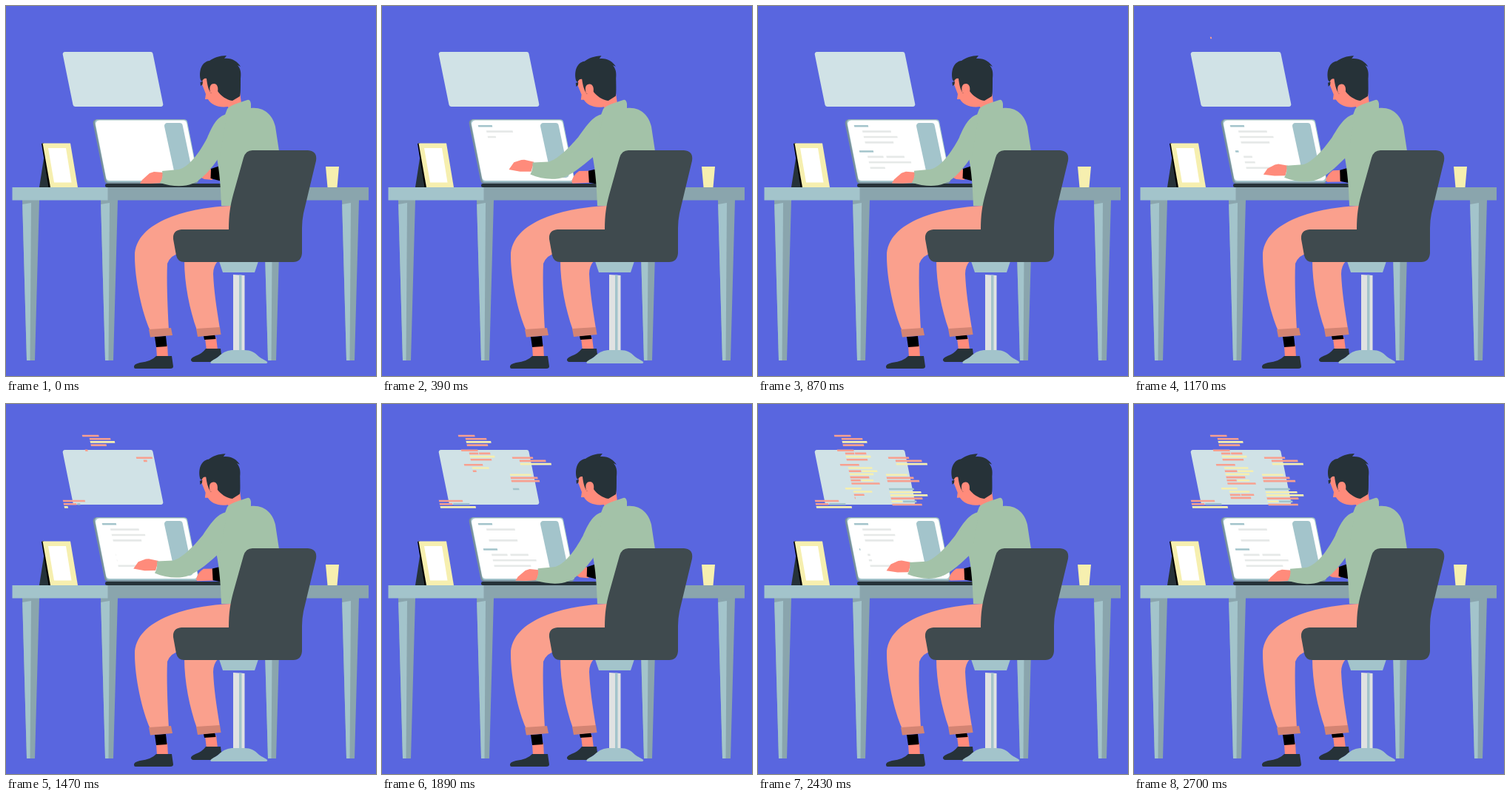
Recreate the animation shown at these times as an HTML page with a canvas. Size 500x500 px, loop 2730 ms.

```html
<!DOCTYPE html>
<html lang="en">
<head>
<meta charset="utf-8">
<title>Working at a desk</title>
<style>
html, body { margin: 0; width: 100%; height: 100%; overflow: hidden; background: #5966df; }
canvas { display: block; width: 500px; height: 500px; }
</style>
</head>
<body>
<canvas id="stage" width="500" height="500"></canvas>
<script>
const ctx = document.getElementById('stage').getContext('2d');
const LOOP = 2730, FRAME = 30, TYPING = 910, GROW = 270;
const C = {
  bg: '#5966df', light: '#a3c4cb', steel: '#8aa5ad', ink: '#263238', skin: '#ff8b7b',
  pants: '#faa08d', cuff: '#d48473', shirt: '#a3c2a8', chair: '#3f4a4e', cream: '#f6efaf',
  glass: '#d0e2e6', post: '#e0e2e2'
};
const INK = { S: '#f8a08f', Y: C.cream, B: C.light, P: '#e6e9e8' };

const clamp = v => Math.max(0, Math.min(1, v));
const easeInOut = u => u < .5 ? 4 * u ** 3 : 1 - 4 * (1 - u) ** 3;
const grow = (t, start) => easeInOut(clamp((t - start) / GROW));
// Swings from 1 to 0 and back once per typing beat.
const swing = t => (1 + Math.cos(2 * Math.PI * t / TYPING)) / 2;

function fill(color, d) {
  ctx.fillStyle = color;
  ctx.fill(new Path2D(d));
}

// Fills a shape between two poses that share the same commands.
function blend(color, from, to, k) {
  const target = to.match(/-?[\d.]+/g);
  let i = 0;
  fill(color, from.replace(/-?[\d.]+/g, n => +n + (target[i++] - n) * k));
}

function rounded(color, radius, ...p) {
  const n = p.length / 2;
  ctx.beginPath();
  ctx.moveTo((p[0] + p[2 * n - 2]) / 2, (p[1] + p[2 * n - 1]) / 2);
  for (let i = 0; i < n; i++) {
    const j = (i + 1) % n;
    ctx.arcTo(p[2 * i], p[2 * i + 1], p[2 * j], p[2 * j + 1], radius);
  }
  ctx.closePath();
  ctx.fillStyle = color;
  ctx.fill();
}

// Each group is a stack of rows; a word such as "SY" is a row split in two colours.
const hologram = [
  { start: 1095, step: 71, groups: [
    { x: 103, y: 43, indent: 9, width: 28, rows: 'S S Y S' },
    { x: 107, y: 62.7, indent: 10, width: 28, rows: 'S SS Y S' },
    { x: 111, y: 82.3, indent: 10, width: 32, rows: 'S Y SY Y S SY S' },
    { x: 118, y: 114.3, indent: 10, width: 27, rows: 'Y Y SS S' }
  ] },
  { start: 1303, step: 80, groups: [
    { x: 176, y: 72.7, indent: 9, width: 35, rows: 'S S Y' },
    { x: 173, y: 95.7, indent: 0, width: 36, rows: 'Y S S' },
    { x: 177, y: 115, indent: 0, width: 42, rows: 'B Y Y S YB S' }
  ] },
  { start: 1270, step: 60, groups: [
    { x: 77, y: 131, indent: 0, width: 40, rows: 'S SB Y' }
  ] }
].map(s => ({ ...s, pitch: 4.2, slant: .9, gap: 1 }));

// Rows listed as retyped are erased and written again from the given time on.
const screenText = {
  start: 100, step: 92, pitch: 7.4, slant: 1.7, gap: 4, header: 19,
  groups: [
    { x: 130, y: 162.2, indent: 9.5, width: 38, rows: 'B P P P', retyped: [2], from: 1.5 * TYPING },
    { x: 137, y: 196.5, indent: 9.5, width: 49, rows: 'B PP P P', retyped: [0, 1, 2], from: TYPING }
  ]
};

function textRow(colors, x, y, width, gap, shown) {
  const split = colors.length > 1 ? width * .43 : width;
  let left = 0;
  [split, width - split - gap].slice(0, colors.length).forEach((w, i) => {
    const visible = Math.min(w, shown * width - left);
    if (visible > .3) {
      fill(INK[colors[i]], `M${x + left - .3} ${y - 1.3}h${visible}l.6 2.6h${-visible}Z`);
    }
    left += w + gap;
  });
}

function textStream({ start, step, pitch, slant, gap, header, groups }, t) {
  let order = 0;
  for (const { x, y, indent, width, rows, retyped = [], from } of groups) {
    rows.split(' ').forEach((colors, i) => {
      const varied = width * (1 + .2 * Math.cos(1.5 * (i - 2)));
      const rewrite = retyped.includes(i) && t > from ? easeInOut(swing(t - from)) : 1;
      textRow(colors, x + (i && indent) + slant * i, y + pitch * i,
        i ? varied : header || varied, gap, grow(t, start + step * order++) * rewrite);
    });
  }
}

function floatingCode(t) {
  rounded(C.glass, 3, 76, 62, 198, 62, 213, 136, 91, 136);
  hologram.forEach(stream => textStream(stream, t));
}

function leg(x) {
  fill(C.steel, `M${x} 262h23l-6 217h-11Z`);
  fill(C.light, `M${x + .2} 268l11.8 -2l-1.5 213h-4.5Z`);
}

function desk() {
  [22, 128, 348, 454].forEach(leg);
  fill(C.steel, 'M137 245H490V262.5H137Z');
  fill(C.light, 'M8.5 245H137.5V262.5H8.5Z');
  fill(C.ink, 'M51.5 203L45 245H59Z');
  fill('#000', 'M48 186L51 185L62 245H57.5Z');
  fill(C.cream, 'M49.5 185.5H87L97 245H60Z');
  fill('#fff', 'M57 192H81L88.5 238.5H65Z');
  fill(C.cream, 'M432 217H450L447.5 245H434.5Z');
}

function laptop(t) {
  rounded('#78909c', 5, 116.5, 153, 244, 153, 261.5, 240, 134, 240);
  rounded(C.light, 4, 119, 153.5, 244.5, 153.5, 261, 238, 136, 238);
  rounded('#fff', 5, 120, 154.5, 243.5, 154.5, 260, 236, 136, 236);
  rounded(C.light, 4, 213, 158, 238, 158, 253.5, 232, 229, 232);
  textStream(screenText, t);
  rounded(C.ink, 2.3, 134, 240, 292, 240, 292, 245, 134, 245);
}

function legs() {
  fill(C.pants, 'M241 344C241 375 248 410 258 438L289 436C284 405 281 385 280 362Q280 351 287 344Z');
  fill(C.skin, 'M269 449L284 448L286 465H271Z');
  fill('#000', 'M267 446L282 444L283.5 450L268 451Z');
  fill(C.cuff, 'M257 436L289 434L290.5 444L259 447Z');
  fill(C.ink, 'M250 479Q249 476 256 473Q265 470 270 463H290L291 471L277 481H253Q251 481 250 479Z');
  fill(C.pants, 'M304 270C250 272 174 290 174 338C174 370 184 415 195 439L220 438C218 400 217 370 218 348Q222 337 236 333L304 342Z');
  fill(C.skin, 'M203 459L218 458L219 475H204Z');
  fill('#000', 'M201 447L216 446L217.5 460L203 461Z');
  fill(C.cuff, 'M193 437L223 435L225 445L195 447.5Z');
  fill(C.ink, 'M173 488Q172 484 181 482Q197 480 203 473H224L226 487Q226 490 222 490H175Q173 490 173 488Z');
}

function head(k) {
  ctx.save();
  ctx.translate(308, 135);
  ctx.rotate(-.023 * k);
  ctx.translate(-308, -135);
  fill(C.skin, 'M266 92L265 106L270 119L269 126L273 126C277 133 287 138 300 136L302 143L318 132L316 115L300 90Z');
  fill(C.ink, 'M263 108L262.5 103L266 102L265.5 106Z');
  fill(C.ink, 'M263 100C260 87 265 75 275 74C281 70 288 67 298 67L295 71C305 70 313 75 317 82L313 80C317 85 318 90 317 98C317 113 317 119 316 122L306 128C298 127 290 121 286 115L277 118C273 112 272 106 271 98Q267 97 265 102Z');
  fill(C.skin, 'M276 117C274 108 277 105 281 105C286 105 287 111 286 116Q282 121 276 117Z');
  ctx.restore();
}

function person(k) {
  blend(C.skin, 'M264 232Q267 225 273 221L279 220V235L268 234Z',
    'M256 238Q257 229 266 223L281 223V239L257 240Z', k);
  blend('#000', 'M277 220L292 215V237L276.5 233Z', 'M279 223L292 220V241L280 239Z', k);
  legs();
  head(k);
  fill(C.shirt, 'M296 147L299 139Q302 135 314 131L326 127Q330 126 331 132V138C350 136 361 149 364 163L369 196V270H291C290 245 289 225 284 200Z');
  blend(C.skin, 'M181 240L184 235L194 226L200 224L213 225L210 239L196 240Z',
    'M171 220L178 210L188 207L192 207L205 210L201 223L186 223Z', k);
  blend(C.shirt, 'M299 146C285 148 278 164 272 178C261 199 247 218 233 221L211 223Q213 232 208 239C224 244 240 245 252 240C267 234 280 216 289 203Z',
    'M299 146C284 148 275 164 265 177C251 193 236 207 225 210L203 211Q204 220 200 227C215 234 234 235 245 231C260 226 276 211 289 201Z', k);
}

function chair() {
  fill(C.light, 'M288 345H341L336 360H293Z');
  fill(C.post, 'M307 363L322.5 364V467H307Z');
  fill(C.light, 'M315 363.5H318.5V467H315Z');
  fill(C.light, 'M277 483C274 480 282 478 287 474C294 467 300 465 308 465H322C331 465 336 468 342 474C347 478 357 481 352 483Z');
  fill(C.chair, 'M333 195H408Q421 196 419 209L402 280Q400 290 400 300V334Q399 346 388 346H241Q232 346 230 337L226 315Q225 303 237 302H301C301 282 303 270 307 255L321 205Q324 195 333 195Z');
}

function draw(now) {
  const t = Math.floor((now % LOOP) / FRAME) * FRAME;
  fill(C.bg, 'M0 0H500V500H0Z');
  floatingCode(t);
  desk();
  laptop(t);
  person(1 - swing(t));
  chair();
}

let began;
function tick(now) {
  began ??= now;
  draw(now - began);
  requestAnimationFrame(tick);
}
draw(0);
requestAnimationFrame(tick);
</script>
</body>
</html>
```
